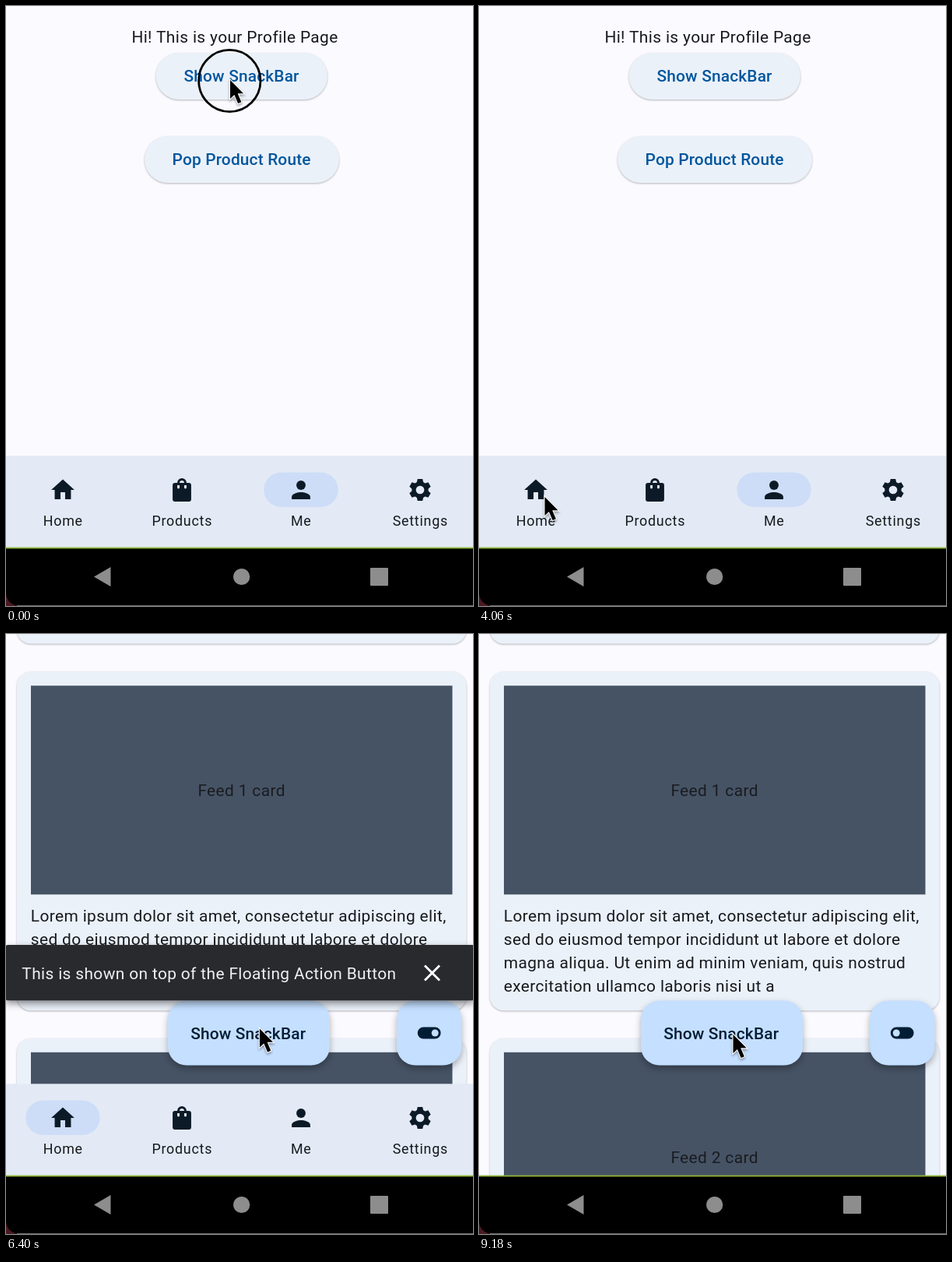
An HTML page for the animation above (9.21 s loop, 600 by 770 pixels).

```html
<!DOCTYPE html>
<html lang="en">
<head>
<meta charset="utf-8">
<title>SnackBar demo</title>
<style>
  html, body { margin: 0; width: 100%; height: 100%; overflow: hidden; background: #fbfaff; }
  svg { display: block; width: 600px; height: 770px; }
  text { font-family: Roboto, "Liberation Sans", sans-serif; font-size: 20.9px; letter-spacing: .37px; fill: #16191d; white-space: pre; }
  .label { font-weight: 500; letter-spacing: .15px; }
  .tab { font-size: 17.9px; letter-spacing: .74px; }
  .mid { text-anchor: middle; }
  .low { filter: drop-shadow(0 1.5px 1px rgba(0, 0, 0, .28)); }
  .high { filter: drop-shadow(0 4px 4px rgba(0, 0, 0, .3)); }
  .bar { filter: drop-shadow(0 4px 5px rgba(0, 0, 0, .45)); }
  .arrow { filter: drop-shadow(0 2px 1.5px rgba(0, 0, 0, .35)); }
</style>
</head>
<body>
<svg id="stage" viewBox="0 0 600 770" xmlns="http://www.w3.org/2000/svg"></svg>
<script>
const LOOP = 9210;
const DP = 1.49;
const TAB_X = [73, 226, 379, 532];
const INK = '#0c1a27';

const rect = (x, y, w, h, r, fill, extra = '') =>
  `<rect x="${x}" y="${y}" width="${w}" height="${h}" rx="${r}" fill="${fill}" ${extra}/>`;
const text = (x, y, str, cls = '', fill = '#16191d') =>
  `<text x="${x}" y="${y}" class="${cls}" style="fill:${fill}">${str}</text>`;
const icon = (x, y, body) =>
  `<g transform="translate(${x} ${y}) scale(${DP}) translate(-12 -12)" fill="${INK}">${body}</g>`;

function gear() {
  const corners = [[-22.5, 7.2], [-13, 9.6], [13, 9.6], [22.5, 7.2]];
  const points = [];
  for (let tooth = 0; tooth < 6; tooth++) {
    for (const [deg, r] of corners) {
      const a = (tooth * 60 + deg) * Math.PI / 180;
      points.push(`${(12 + r * Math.sin(a)).toFixed(2)} ${(12 - r * Math.cos(a)).toFixed(2)}`);
    }
  }
  const hole = 'M15.6 12a3.6 3.6 0 1 0-7.2 0a3.6 3.6 0 1 0 7.2 0z';
  return `<path fill-rule="evenodd" d="M${points.join('L')}z${hole}"/>`;
}

const TABS = [
  ['Home', '<path d="M10 20v-6h4v6h5v-8h3L12 3 2 12h3v8z"/>'],
  ['Products', `<path fill-rule="evenodd" d="M18 6h-2a4 4 0 0 0-8 0H6a2 2 0 0 0-2 2v12a2 2 0 0 0 2 2h12
    a2 2 0 0 0 2-2V8a2 2 0 0 0-2-2zM10 10a1 1 0 0 1-2 0V8h2zM12 4a2 2 0 0 1 2 2h-4a2 2 0 0 1 2-2zM16 10a1 1 0 0 1-2 0V8h2z"/>`],
  ['Me', '<circle cx="12" cy="8" r="4"/><path d="M12 14c-2.67 0-8 1.34-8 4v2h16v-2c0-2.66-5.33-4-8-4z"/>'],
  ['Settings', gear()]
];

const RIPPLES = [
  { id: 'showRipple', box: [192.5, 60, 220.5, 60, 30], at: [288, 95], down: 0, up: 110, size: 190, color: '#00569e' },
  { id: 'fabRipple', box: [208, 470.5, 208, 83, 24], at: [295, 506], down: 5220, up: 5440, size: 230, color: '#001d35' },
  { id: 'toggleRipple', box: [502, 470.5, 83.5, 83, 24], at: [528, 511], down: 7470, up: 7620, size: 120, color: '#001d35' }
];
const ripple = ({ id, box: [x, y, w, h, r], at, color }) => `
  <clipPath id="${id}Clip">${rect(x, y, w, h, r, '#000')}</clipPath>
  <g clip-path="url(#${id}Clip)"><circle id="${id}" cx="${at[0]}" cy="${at[1]}" r="0" fill="${color}" style="filter:blur(6px)"/></g>`;

const pillButton = (x, y, w, label, extra = '') =>
  rect(x, y, w, 60, 30, '#ebf1f9', 'class="low"') + extra + text(302.6, y + 37.3, label, 'label mid', '#00569e');

const LOREM = [
  'Lorem ipsum dolor sit amet, consectetur adipiscing elit,',
  'sed do eiusmod tempor incididunt ut labore et dolore',
  'magna aliqua. Ut enim ad minim veniam, quis nostrud',
  'exercitation ullamco laboris nisi ut a'
];
const card = (n, y) =>
  rect(14, y, 577.5, 435, 18, '#ebf1f9', 'class="low"') +
  rect(32, y + 18, 541.5, 268, 0, '#465365') +
  text(302.6, y + 160, `Feed ${n} card`, 'mid', '#1a1c20') +
  LOREM.map((line, i) => text(31.8, y + 320.6 + i * 29.9, line)).join('');

const snack = (id, y, label, action) => `
  <clipPath id="${id}Clip"><rect id="${id}Mask" x="-5" y="0" width="610" height="100"/></clipPath>
  <g id="${id}" clip-path="url(#${id}Clip)">
    ${rect(-.5, y, 602, 71.3, 3, '#282a2e', 'class="bar"')}
    ${text(20.3, y + 43.7, label, '', '#f0f0f4')}
    ${action ? text(411.8, y + 43.7, action, 'label', '#85c4fb') : ''}
    <path d="M538 ${y + 26.5}l19 19m0-19l-19 19" stroke="#fff" stroke-width="2.9"/>
  </g>`;

document.getElementById('stage').innerHTML = `
  <rect width="600" height="770" fill="#fbfaff"/>
  <g id="profile">
    ${text(161.4, 46.6, 'Hi! This is your Profile Page')}
    ${pillButton(192.5, 60, 220.5, 'Show SnackBar', ripple(RIPPLES[0]))}
    ${pillButton(178, 167, 250, 'Pop Product Route')}
  </g>
  <g id="home">
    <rect width="600" height="770" fill="#fbfaff"/>
    ${card(0, -422.5)}${card(1, 48.3)}${card(2, 518.8)}
    ${rect(208, 470.5, 208, 83, 24, '#c4dfff', 'class="high"')}
    ${ripple(RIPPLES[1])}
    ${text(311.2, 519.8, 'Show SnackBar', 'label mid', '#001d35')}
    ${rect(502, 470.5, 83.5, 83, 24, '#c4dfff', 'class="high"')}
    ${ripple(RIPPLES[2])}
    ${rect(528.8, 504.6, 29.8, 14.9, 7.45, '#001d35')}
    <circle id="knob" cy="512" r="4.5" fill="#c4dfff"/>
  </g>
  <g id="nav">
    <rect y="577.3" width="600" height="120" fill="#e3eaf5"/>
    <rect id="pillMe" y="598.5" height="44.5" rx="22.25" fill="#cdddf8"/>
    <rect id="pillHome" y="598.5" height="44.5" rx="22.25" fill="#cdddf8"/>
    ${TABS.map(([name, body], i) => icon(TAB_X[i], 621, body) + text(TAB_X[i] + .3, 667, name, 'tab mid')).join('')}
  </g>
  ${snack('profileSnack', 506, 'This is a Floating SnackBar', 'Action')}
  ${snack('homeSnack', 399, 'This is shown on top of the Floating Action Button')}
  <rect y="695" width="600" height="75" fill="#4a1a22"/>
  <path d="M0 695H600V770H16Q2 768 0 755z" fill="#000"/>
  <rect y="694.6" width="600" height="1.8" fill="#8eb638"/>
  <rect x="14" y="769" width="586" height="1" fill="#6c6c6c"/>
  <g fill="#8d8d8d">
    <path d="M113 732.5L134.5 720V745z"/>
    <circle cx="302.7" cy="732.5" r="10.6"/>
    <rect x="468" y="721" width="23" height="23" rx="1"/>
  </g>
  <g id="cursor">
    <circle id="ring" cx="-.7" cy="1" r="39.7" fill="none" stroke="#000" stroke-width="2.8"/>
    <path class="arrow" d="M0 0V24l5.4-5.1 4.7 11.1 4.3-1.8-4.7-10.9h7.4z" fill="#000" stroke="#fff" stroke-width="2.2" paint-order="stroke"/>
  </g>`;

const el = id => document.getElementById(id);
const set = (id, attrs) => { for (const k in attrs) el(id).setAttribute(k, attrs[k]); };
const show = (id, on) => { el(id).style.display = on ? '' : 'none'; };
const progress = (t, start, length) => Math.min(1, Math.max(0, (t - start) / length));
const easeInOut = p => p * p * (3 - 2 * p);
const easeOut = p => 1 - (1 - p) ** 3;
const inOutQuart = p => p < .5 ? 8 * p ** 4 : 1 - 8 * (1 - p) ** 4;

// Cursor moves: start, end, target x, target y
const MOVES = [
  [950, 2150, 540, 537],
  [2980, 3950, 84.5, 630],
  [4430, 5100, 295, 506],
  [6150, 7250, 528.5, 510],
  [8050, 9050, 326.5, 514]
];
const PRESSES = [[0, 110], [2590, 2710], [4120, 4230], [5220, 5440], [7470, 7620]];
const HOME_AT = 4240;
const NAV_OFF_AT = 7650;

function cursorAt(t) {
  let x = 288, y = 95;
  for (const [start, end, toX, toY] of MOVES) {
    const p = easeInOut(progress(t, start, end - start));
    x += (toX - x) * p;
    y += (toY - y) * p;
  }
  return `translate(${x.toFixed(2)} ${y.toFixed(2)})`;
}

function drawSnack(id, top, t, enter, leave) {
  const p = progress(t, enter, 250);
  const opacity = progress(p, .4, .2) * (1 - progress(t, leave, 220));
  show(id, opacity > 0);
  set(id, { opacity });
  const y = p < 1 ? top + 71 * (1 - inOutQuart(p)) : top - 20;
  set(id + 'Mask', { y, height: top + 100 - y });
}

function drawPill(id, x, scale, opacity) {
  const width = 95.5 * scale;
  set(id, { x: x - width / 2, width, opacity });
}

function draw(t) {
  const navOn = t < NAV_OFF_AT;
  show('home', t >= HOME_AT);
  set('home', { opacity: progress(t, HOME_AT, 200) });
  show('nav', navOn);
  set('knob', { cx: navOn ? 551.2 : 536.2 });

  drawPill('pillMe', TAB_X[2], 1, 1 - progress(t, HOME_AT, 100));
  drawPill('pillHome', TAB_X[0], .4 + .6 * easeOut(progress(t, HOME_AT, 450)), progress(t, HOME_AT, 100));

  for (const { id, down, up, size } of RIPPLES) {
    const r = size * easeOut(progress(t, down, 400));
    set(id, { r, opacity: .15 * progress(t, down, 80) * (1 - progress(t, up + 30, 350)) });
  }

  drawSnack('profileSnack', 506, t, 130, 2720);
  drawSnack('homeSnack', 399, t, 5460, 8680);

  set('cursor', { transform: cursorAt(t) });
  show('ring', PRESSES.some(([down, up]) => t >= down && t < up));
}

const began = performance.now();
function tick() {
  draw((performance.now() - began) % LOOP);
  requestAnimationFrame(tick);
}
tick();
</script>
</body>
</html>
```
